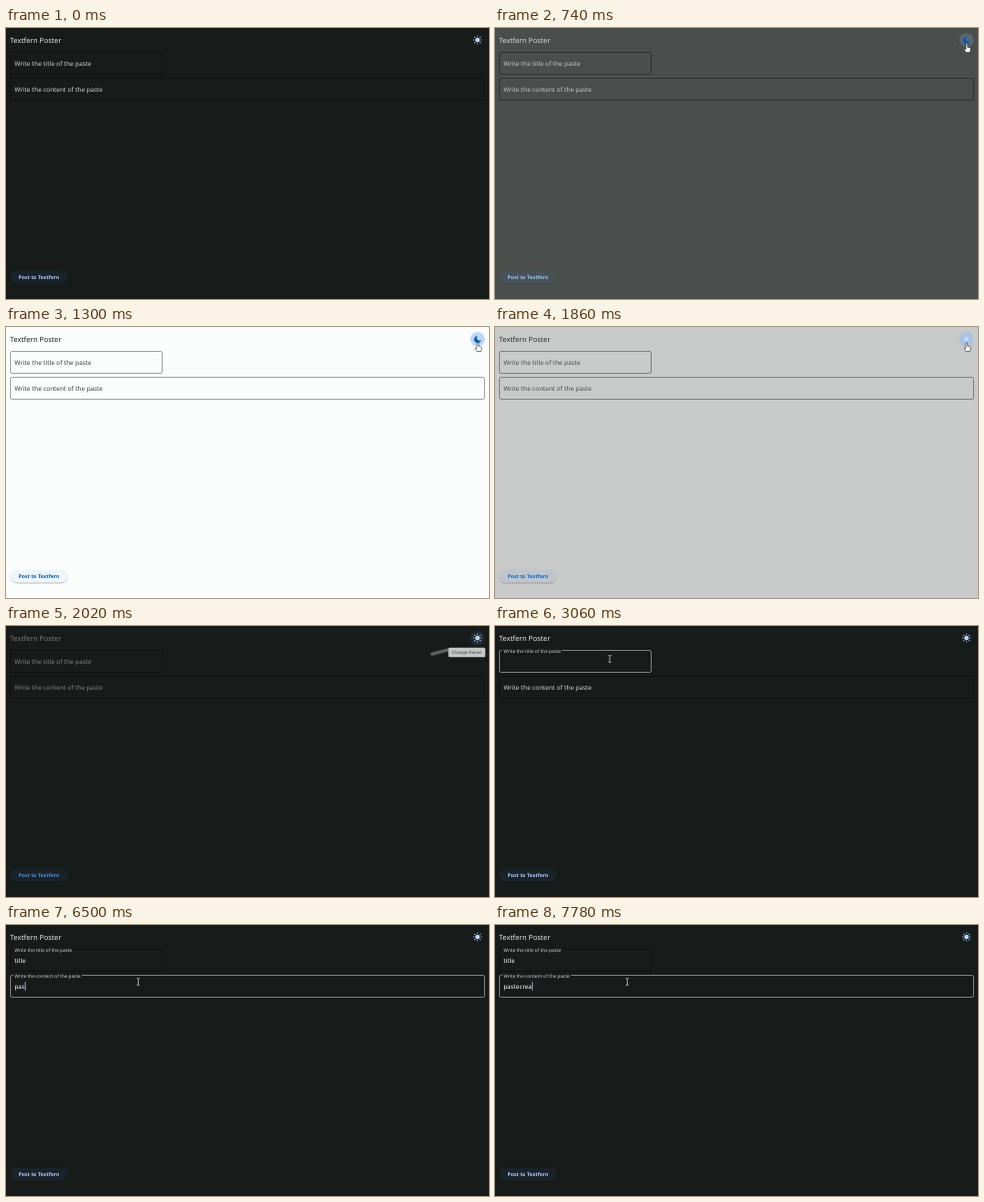
Recreate the animation shown at these times as an HTML page. Size 484 by 272 pixels, loop 8 s.

```html
<!DOCTYPE html>
<html lang="en">
<head>
<meta charset="utf-8">
<title>Textfern Poster</title>
<style>
html, body { margin: 0; width: 100%; height: 100%; overflow: hidden; background: #171c1b; }
svg { display: block; width: 484px; height: 272px; }
text { font-family: "Noto Sans", "Open Sans", sans-serif; text-rendering: geometricPrecision; white-space: pre; }
</style>
</head>
<body>
<svg viewBox="0 0 484 272">
  <rect id="page" width="484" height="272"/>
  <text id="title" x="4" y="15.4" font-size="7.2" font-weight="500">Textfern Poster</text>
  <g id="fields"></g>
  <rect id="shadow" x="4.3" y="244.3" width="57.4" height="13.2" rx="6.6"/>
  <rect id="pill" x="4" y="243.5" width="58" height="13" rx="6.5"/>
  <text id="post" x="33" y="252.3" font-size="5.15" font-weight="600" text-anchor="middle">Post to Textfern</text>
  <circle id="halo" cx="472.5" cy="12.2" r="7.3" fill="#8ab8f8"/>
  <g id="sun" fill="#c0daff" stroke="#a8c8ff">
    <circle cx="472.5" cy="12" r="2.3" stroke="none"/>
    <circle cx="472.5" cy="12" r="3.7" fill="none" stroke-width="1.4" pathLength="8" stroke-dasharray=".3 .7" stroke-dashoffset=".15"/>
  </g>
  <path id="moon" fill="#0b57a8" d="M472.7 9a3.4 3.4 0 1 0 3.3 3.9a2.1 2.1 0 0 1-3.3-3.9z"/>
  <g id="tip">
    <rect x="443.3" y="21.7" width="37" height="9.6" rx="1.4" fill="#c4c7c5"/>
    <text x="461.8" y="28.2" font-size="4.35" text-anchor="middle" fill="#3c403f">Change theme</text>
  </g>
  <line id="trail" stroke="#c4c7c5" stroke-width="3.4" stroke-linecap="round" opacity=".4"/>
  <path id="hand" fill="#fff" stroke="#111" stroke-width=".5" stroke-linejoin="round"
    d="M-.8 0Q0-.9 .8 0V3.2L3.5 4Q4 4.2 3.9 5L3.2 8.5H-.9L-2.8 5.3Q-2.5 4.2-.8 5.5Z"/>
  <path id="beam" fill="none" stroke="#d5d8d7" stroke-width=".7" d="M-1.6-3.4H-.5L0-3L.5-3.4H1.6M0-3V3M-1.6 3.4H-.5L0 3L.5 3.4H1.6"/>
</svg>
<script>
const LOOP = 8000, TO_LIGHT = 700, TO_DARK = 1820;
const el = id => document.getElementById(id);
const clamp = v => Math.max(0, Math.min(1, v));
const lerp = (a, b, p) => a + (b - a) * p;
const smooth = p => p * p * (3 - 2 * p);
const set = (node, attrs) => { for (const k in attrs) node.setAttribute(k, attrs[k]); };
const show = (node, on) => node.setAttribute("visibility", on ? "visible" : "hidden");
const mix = (a, b, p) => `rgb(${a.map((v, i) => Math.round(lerp(v, b[i], p)))})`;

// pointer stops: time, x, y
const stops = [[500, 490, 62], [680, 472.8, 16], [1940, 472.8, 16], [2020, 428, 28], [2180, 290, 44],
  [2400, 115, 33], [5140, 115, 33], [5220, 111, 33.5], [5300, 116, 45], [5440, 132.5, 57]];

// key times line up with the letters of the typed text
const fields = [
  { y: 24.5, right: 156.5, notch: 67, label: "Write the title of the paste",
    typed: "title", keys: [4260, 4420, 4500, 4660, 4720], focus: 2480, blur: 5440 },
  { y: 50.5, right: 479.5, notch: 76, label: "Write the content of the paste",
    typed: "pastecrea", keys: [6100, 6180, 6500, 6660, 6820, 7060, 7380, 7460, 7780], focus: 5440, blur: LOOP }
];

function add(parent, tag, attrs) {
  const node = document.createElementNS("http://www.w3.org/2000/svg", tag);
  set(node, attrs);
  return parent.appendChild(node);
}

for (const f of fields) {
  const g = el("fields");
  f.box = add(g, "path", { fill: "none", "stroke-width": .8 });
  f.hint = add(g, "text", { x: 8.5 });
  f.hint.textContent = f.label;
  f.value = add(g, "text", { x: 8.5, y: f.y + 13.3, "font-size": 6.2, "font-weight": 500, fill: "#fff" });
  f.caret = add(g, "rect", { y: f.y + 6.7, width: .7, height: 8.6, fill: "#c8dcff" });
}

function pointer(t) {
  const i = stops.findIndex(s => s[0] > t);
  if (i < 0) return stops.at(-1).slice(1);
  if (i === 0) return stops[0].slice(1);
  const a = stops[i - 1], b = stops[i], p = (t - a[0]) / (b[0] - a[0]);
  return [lerp(a[1], b[1], p), lerp(a[2], b[2], p)];
}

function drawField(f, t, ink) {
  const float = smooth(clamp((t - f.focus) / 150));
  const active = float * (1 - clamp((t - f.blur) / 150));
  const { y, right } = f, start = lerp(20, 7, float), end = lerp(20, f.notch, float);
  set(f.box, {
    d: `M${end} ${y}H${right - 1.6}q1.6 0 1.6 1.6v18.8q0 1.6-1.6 1.6H6.1q-1.6 0-1.6-1.6v-18.8q0-1.6 1.6-1.6H${start}`,
    stroke: mix([0, 0, 0], [215, 219, 217], active),
    "stroke-opacity": lerp(.45, .65, active)
  });
  set(f.hint, { y: y + lerp(13.5, 2, float), "font-size": lerp(6.3, 4.73, float), fill: ink });

  const count = f.keys.filter(k => k <= t).length;
  f.value.textContent = f.typed.slice(0, count);
  const since = t - (count ? f.keys[count - 1] : f.focus);
  show(f.caret, t >= f.focus && t < f.blur && Math.floor(since / 500) % 2 === 0);
  set(f.caret, { x: 8.6 + (count ? f.value.getComputedTextLength() : 0) });
}

function drawPointer(t) {
  const [x, y] = pointer(t), [px, py] = pointer(t - 28);
  const fast = t > 1940 && t < 2400;
  const move = `translate(${x} ${y})`;
  set(el("hand"), { transform: move });
  set(el("beam"), { transform: move, opacity: t > 5180 && t < 5300 ? .6 : 1 });
  set(el("trail"), { x1: px, y1: py, x2: x, y2: y });
  show(el("hand"), t >= 500 && t <= 1940);
  show(el("trail"), fast);
  show(el("beam"), t >= 2400);
}

function draw(t) {
  // the page colour turns quickly, the text follows more slowly
  const turn = (lead, span) => smooth(clamp((t - TO_LIGHT + lead) / span)) - smooth(clamp((t - TO_DARK + lead) / span));
  const fade = turn(33, 240);
  const slow = clamp((t - TO_LIGHT) / 440) - clamp((t - TO_DARK) / 440);
  const hover = clamp((t - 620) / 80) * (1 - clamp((t - 2000) / 160));

  set(el("page"), { fill: mix([23, 28, 27], [250, 253, 251], fade) });
  set(el("title"), { fill: mix([232, 236, 234], [25, 28, 27], slow) });
  const ink = mix([208, 212, 210], [60, 64, 64], slow);
  fields.forEach(f => drawField(f, t, ink));

  set(el("shadow"), { opacity: lerp(.1, .25, fade) });
  set(el("pill"), { fill: mix([26, 34, 42], [240, 245, 251], fade) });
  set(el("post"), { fill: mix([174, 203, 250], [0, 93, 176], slow) });

  const light = t >= TO_LIGHT && t < TO_DARK;
  show(el("moon"), light);
  show(el("sun"), !light);
  set(el("halo"), { opacity: hover * lerp(.12, .55, fade) });
  set(el("tip"), { opacity: clamp((t - 1940) / 60) * (1 - clamp((t - 2140) / 100)) });
  drawPointer(t);
}

function tick() {
  draw(performance.now() % LOOP);
  requestAnimationFrame(tick);
}
tick();
</script>
</body>
</html>
```
